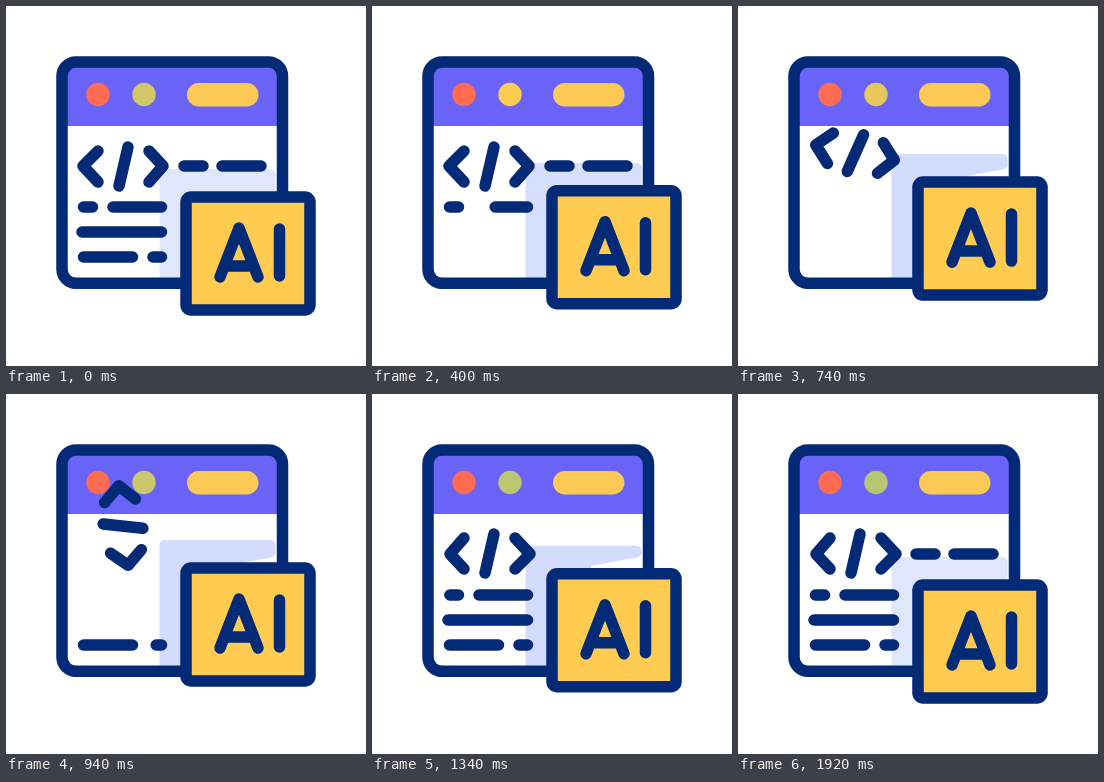
Write an HTML page that moves like this. It is 360 px wide and 360 px high and loops after 1960 ms.

```html
<!DOCTYPE html>
<html lang="en">
<head>
<meta charset="utf-8">
<title>AI code window</title>
<style>
  html, body { margin: 0; width: 100%; height: 100%; overflow: hidden; background: #fff; }
  svg { display: block; width: 100vw; height: 100vh; }
  .ink { fill: none; stroke: #032a76; stroke-width: 11.5; stroke-linecap: round; stroke-linejoin: round; }
</style>
</head>
<body>
<svg viewBox="0 0 360 360">
  <clipPath id="inside"><rect x="56" y="56" width="221" height="221" rx="14"/></clipPath>
  <g clip-path="url(#inside)">
    <rect id="shade" x="153.5" y="163" width="116" height="150" rx="5"/>
    <path id="notch" fill="#fff" d="M272 157Q270 164 256 165L219 172V186H272z"/>
    <path fill="#6a63f8" d="M56 56H277V120H56z"/>
  </g>
  <circle cx="92" cy="88.5" r="11.7" fill="#ff6c52"/>
  <circle id="dot" cx="138" cy="88.5" r="11.7"/>
  <rect x="181" y="77" width="71.5" height="23.5" rx="11.7" fill="#fdc955"/>
  <rect class="ink" x="56" y="56" width="220.5" height="221.3" rx="14"/>
  <path id="lines" class="ink"/>
  <path id="tag" class="ink" d="M-25.5-15L-40.500 0L-25.5 16M4.500-19L-4.500 20M25.5-15L39.5 0L25.5 16"/>
  <g id="card" class="ink">
    <rect x="180" y="191" width="124" height="113" rx="5" fill="#ffcb50"/>
    <path d="M214 271L233 222L252 271M222 260H244M273.5 223V270"/>
  </g>
</svg>
<script>
const $ = id => document.getElementById(id);
const set = (id, name, value) => $(id).setAttribute(name, value);
const LOOP = 1960, STEP = 20, LAST = 1920;
const span = (t, a, b) => Math.min(1, Math.max(0, (t - a) / (b - a)));
const wave = p => (1 - Math.cos(Math.PI * p)) / 2;
const blend = (a, b, k) => `rgb(${a.map((v, i) => Math.round(v + (b[i] - v) * k))})`;

// x1, x2, y in the order the lines vanish and return
const dashes = [
  [77.5, 126.5, 251], [147, 155.5, 251], [76, 155.5, 226], [107, 155.5, 201],
  [77.5, 86.5, 201], [216, 255, 160], [178, 197, 160]
];

// time and yellowness of the blinking dot
const glow = [[0, .4], [430, 1], [1250, .05], [1610, .9], [LAST, .1]];

function glowAt(t) {
  const i = Math.max(1, glow.findIndex(k => k[0] >= t));
  const [a, from] = glow[i - 1], [b, to] = glow[i];
  return from + (to - from) * wave(span(t, a, b));
}

function dash([x1, x2, y], i, t) {
  const erase = 200 + 60 * i, draw = 745 + 120 * i;
  const shown = 1 - span(t, erase, erase + 60) + span(t, draw, draw + 120);
  return shown > 0 ? `M${x2 - (x2 - x1) * shown} ${y}H${x2}` : "";
}

function render(t) {
  const lift = wave(2 * t / LAST);
  const rise = `translate(0 ${-17 * lift})`;
  set("card", "transform", rise);
  set("shade", "transform", rise);
  set("shade", "fill", blend([224, 231, 253], [211, 220, 253], span(lift, 0, .5)));
  set("notch", "visibility", t > 640 && t < 1400 ? "visible" : "hidden");
  set("dot", "fill", blend([176, 197, 120], [253, 203, 80], glowAt(t)));
  set("lines", "d", dashes.map((d, i) => dash(d, i, t)).join(""));

  const hop = span(t, 640, 1270);
  const y = 160 - 28 * Math.sin(Math.PI * hop);
  set("tag", "transform", `translate(117.5 ${y}) rotate(${180 * wave(hop)})`);
}

const start = performance.now();
function tick() {
  const t = (performance.now() - start) % LOOP;
  render(Math.min(LAST, Math.floor(t / STEP) * STEP));
  requestAnimationFrame(tick);
}
tick();
</script>
</body>
</html>
```
